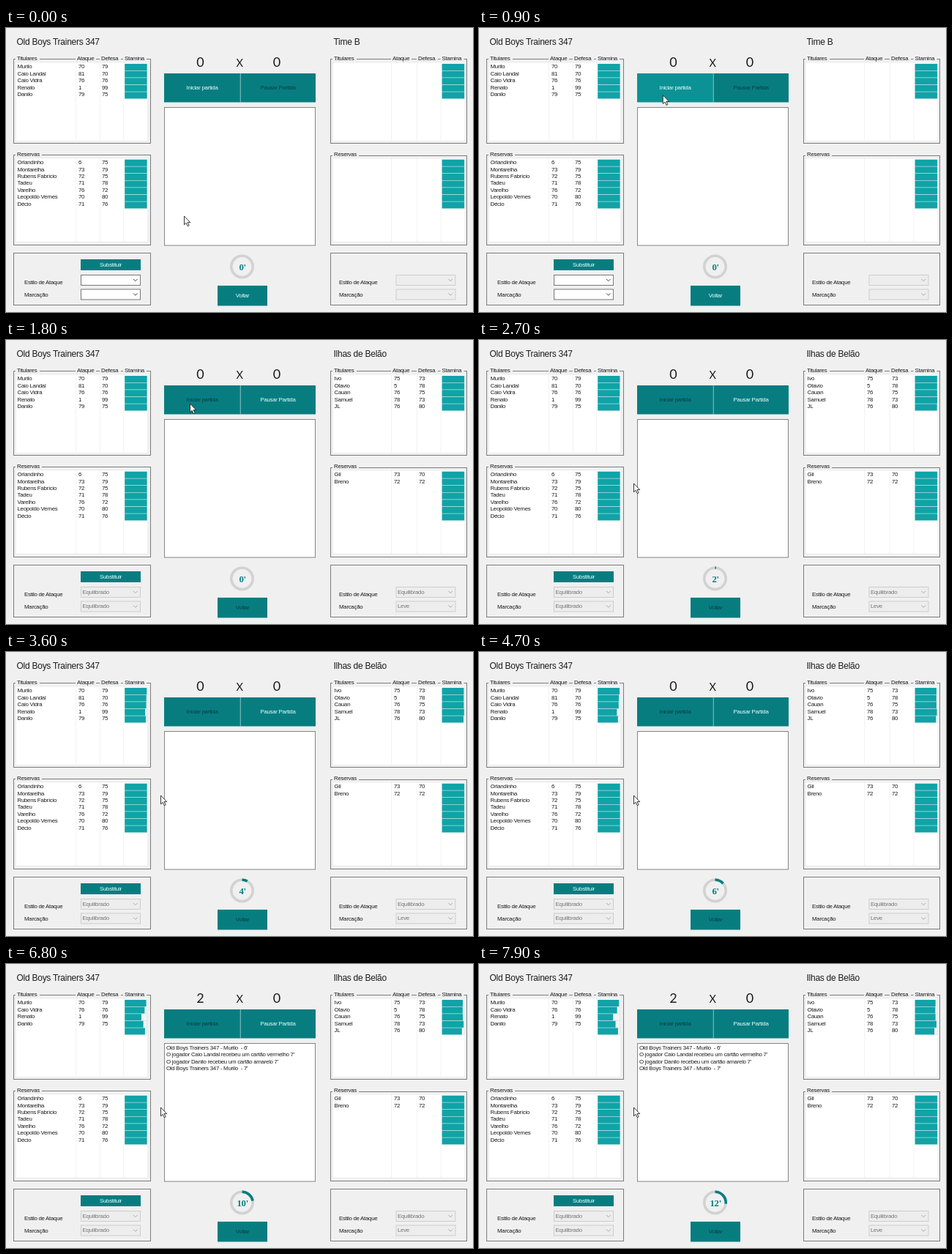
Recreate the animation shown at these times as an HTML page. Size 638 px wide and 388 px high, loop 8 s.

```html
<!DOCTYPE html>
<html lang="pt">
<head>
<meta charset="utf-8">
<style>
html, body { margin: 0; width: 100%; height: 100%; overflow: hidden; background: #f0f0f0; }
svg { display: block; width: 100vw; height: 100vh; }
text { font: 7.9px "Liberation Sans", Arial, sans-serif; letter-spacing: -.29px; white-space: pre; }
</style>
</head>
<body>
<svg id="stage" viewBox="0 0 638 388"></svg>
<script>
const LOOP = 8000, STEP = 100;
const KICKOFF = 1460, MINUTE = 508;
const CLICK = 1400, LOADED = 1600, GOAL1 = 4800, GOAL2 = 5200;
const TEAL = '#087d80', HOVER = '#0c9295', BAR = '#10a3a7', BG = '#f0f0f0', INK = '#1c1c1c';

// Players: name, attack, defence, stamina lost per minute
const home = {
  name: 'Old Boys Trainers 347',
  main: [['Murilo', 70, 79, .12], ['Caio Landal', 81, 70, .3], ['Caio Vidra', 76, 76, .36],
         ['Renato', 1, 99, .85], ['Danilo', 79, 75, .55]],
  bench: [['Orlandinho', 6, 75], ['Montarelha', 73, 79], ['Rubens Fabrício', 72, 75], ['Tadeu', 71, 78],
          ['Varelho', 76, 72], ['Leopoldo Vernes', 70, 80], ['Décio', 71, 76]]
};
const away = {
  name: 'Ilhas de Belão',
  main: [['Ivo', 75, 73, .22], ['Otavio', 5, 78, .25], ['Cauan', 76, 75, .22],
         ['Samuel', 78, 73, .1], ['JL', 76, 80, .36]],
  bench: [['Gil', 73, 70], ['Breno', 72, 72]]
};

const rect = (x, y, w, h, fill, stroke = 'none') =>
  `<rect x="${x}" y="${y}" width="${w}" height="${h}" fill="${fill}" stroke="${stroke}"/>`;
const text = (x, y, s, fill = INK, style = '', anchor = 'start') =>
  `<text x="${x}" y="${y}" fill="${fill}" text-anchor="${anchor}" style='${style}'>${s}</text>`;
const frame = (x, y, w, h, fill = 'none', stroke = '#7c7c7c') =>
  rect(x + .5, y + .5, w - 1, h - 1, fill, stroke);

function caption(x, y, s, w) {
  return rect(x - 2, y - 7, w + 4, 9, BG) + text(x, y, s);
}

function button(x, y, w, h, label, on = true, fill = TEAL) {
  return rect(x, y, w, h, fill) +
    text(x + w / 2, y + h / 2 + 2.7, label, on ? '#e8ffff' : '#063f42', '', 'middle');
}

function combo(x, y, value, on) {
  return frame(x, y, 82, 15, on ? '#fff' : '#ededed', on ? '#777' : '#cdcdcd') +
    text(x + 2.5, y + 9.8, value, '#777') +
    `<path d="M${x + 72} ${y + 6}l2.8 2.8 2.8-2.8" fill="none" stroke="${on ? '#444' : '#aaa'}"/>`;
}

// One list of players: cols holds the x of attack, defence and stamina
function table(x, y, h, cols, rows, losses) {
  const [attack, defence, bar] = cols;
  let out = rect(x, y, bar + 31 - x, h, '#fff');
  for (const c of cols)
    out += `<path d="M${c - 1.5} ${y}v${h}" stroke="#e6e6e6" stroke-dasharray="1 1"/>`;
  losses.forEach((loss, i) => {
    const top = y + 1 + i * 9.6;
    out += rect(bar, top, 30.8, 9.6, '#b5dfe0') + rect(bar + .2, top + .3, 30.3, 9, '#f4f4f4') +
      rect(bar + .2, top + .3, 30.4 - loss, 9, BAR);
  });
  rows.forEach(([name, a, d], i) => {
    const base = y + 7.7 + i * 9.4;
    out += text(x + 1.5, base, name) + text(attack + 2, base, a) + text(defence + 1, base, d);
  });
  return out;
}

function side(x, w, benchY, cols, title, main, bench, losses) {
  const [attack, defence, bar] = cols;
  return text(x + 4.5, 22.7, title, INK, 'font-size:12px;letter-spacing:-.26px') +
    frame(x, 42, w, 116) + caption(x + 5, 44, 'Titulares', 29) +
    caption(attack, 44, 'Ataque', 24) + caption(defence, 44, 'Defesa', 25) +
    caption(bar, 44.4, 'Stamina', 28) +
    table(x + 4, 47.7, 106, cols, main, losses) +
    frame(x, benchY, w, 297 - benchY) + caption(x + 5, 175, 'Reservas', 32) +
    table(x + 4, 178.5, 113, cols, bench, Array(7).fill(0)) +
    frame(x, 307, w, 72);
}

function styles(x, comboX, attack, marking, on) {
  return text(x, 350, 'Estilo de Ataque') + text(x, 366.5, 'Marcação') +
    combo(comboX, 337, attack, on) + combo(comboX, 356.5, marking, on);
}

function clock(t, minute) {
  const value = Math.max(0, Math.min(minute, (t - 2500) / 300));
  const length = 2 * Math.PI * 14.7;
  const ring = (color, extra = '') =>
    `<circle cx="322.5" cy="326" r="14.7" fill="none" stroke="${color}" stroke-width="3.6" ${extra}/>`;
  return ring('#d2d2d2') +
    (value ? ring(TEAL, `stroke-dasharray="${length * value / 45} 200" transform="rotate(-90 322.5 326)"`) : '') +
    text(323.2, 330.6, minute + "'", TEAL, 'font:bold 12.8px "Liberation Serif",serif', 'middle');
}

function pointer(t) {
  if (t >= 2500) return [211, 196];
  if (t >= 2300) return [215, 192];
  const k = Math.min(1, Math.max(0, t / 1000));
  const e = k * k * (3 - 2 * k);
  return [243 + 8 * e, 257 - 170 * e];
}

function draw(t) {
  const clicked = t >= CLICK, loaded = t >= LOADED;
  const minute = Math.max(0, Math.floor((t - KICKOFF) / MINUTE));
  const goals = (t >= GOAL1) + (t >= GOAL2);
  const [px, py] = pointer(t);
  const drain = p => p[3] * Math.max(0, minute - 1);

  let squad = home.main, losses = squad.map(drain);
  if (goals > 1) {
    squad = squad.filter((p, i) => i !== 1);
    losses = [...squad.map(drain), 2.7];
  }
  const goal = m => `${home.name} - ${home.main[0][0]}  - ${m}'`;
  const card = (i, color) => `O jogador ${home.main[i][0]} recebeu um cartão ${color} 7'`;
  const log = [goal(6), card(1, 'vermelho'), card(4, 'amarelo'), goal(7)].slice(0, [0, 1, 4][goals]);

  const score = 'font:18px Lato,sans-serif;letter-spacing:0';
  const even = 'Equilibrado';
  const hover = !loaded && py < 101;

  stage.innerHTML = rect(0, 0, 638, 388, BG) +
    side(10, 188, 173, [97, 130, 162], home.name, squad, home.bench, losses) +
    side(443, 187, 174, [528, 563, 595.5], loaded ? away.name : 'Time B',
      loaded ? away.main : [], loaded ? away.bench : [], away.main.map(drain)) +
    button(102, 316, 82, 15, 'Substituir') +
    styles(25, 102, loaded ? even : '', loaded ? even : '', !loaded) +
    styles(455, 532.5, clicked ? even : '', clicked ? 'Leve' : '', false) +
    text(265.5, 53, goals, INK, score, 'middle') +
    text(319, 52.6, 'X', INK, 'font:14.5px Lato,sans-serif', 'middle') +
    text(370, 53, 0, INK, score, 'middle') +
    button(216, 62, 104, 39.5, 'Iniciar partida', !loaded, hover ? HOVER : TEAL) +
    button(320, 62, 103, 39.5, 'Pausar Partida', clicked) +
    rect(319.8, 62, .8, 39.5, '#a9d5d6') +
    frame(216, 108, 207, 189.5, '#fff', '#868686') +
    log.map((s, i) => text(219, 117 + i * 9.35, s)).join('') +
    clock(t, minute) +
    button(289, 352, 68, 27.5, 'Voltar', !clicked) +
    `<path transform="translate(${px} ${py})" d="M.5 0v11.8l2.7-2.5 2 4.4 1.9-.9-2-4.2h3.6z"
      fill="#fff" stroke="#222" stroke-width=".9"/>`;
}

const stage = document.getElementById('stage');
let start, shown = -1;
function tick(now) {
  start ??= now;
  const t = Math.floor((now - start) % LOOP / STEP) * STEP;
  if (t !== shown) draw(shown = t);
  requestAnimationFrame(tick);
}
draw(0);
requestAnimationFrame(tick);
</script>
</body>
</html>
```
